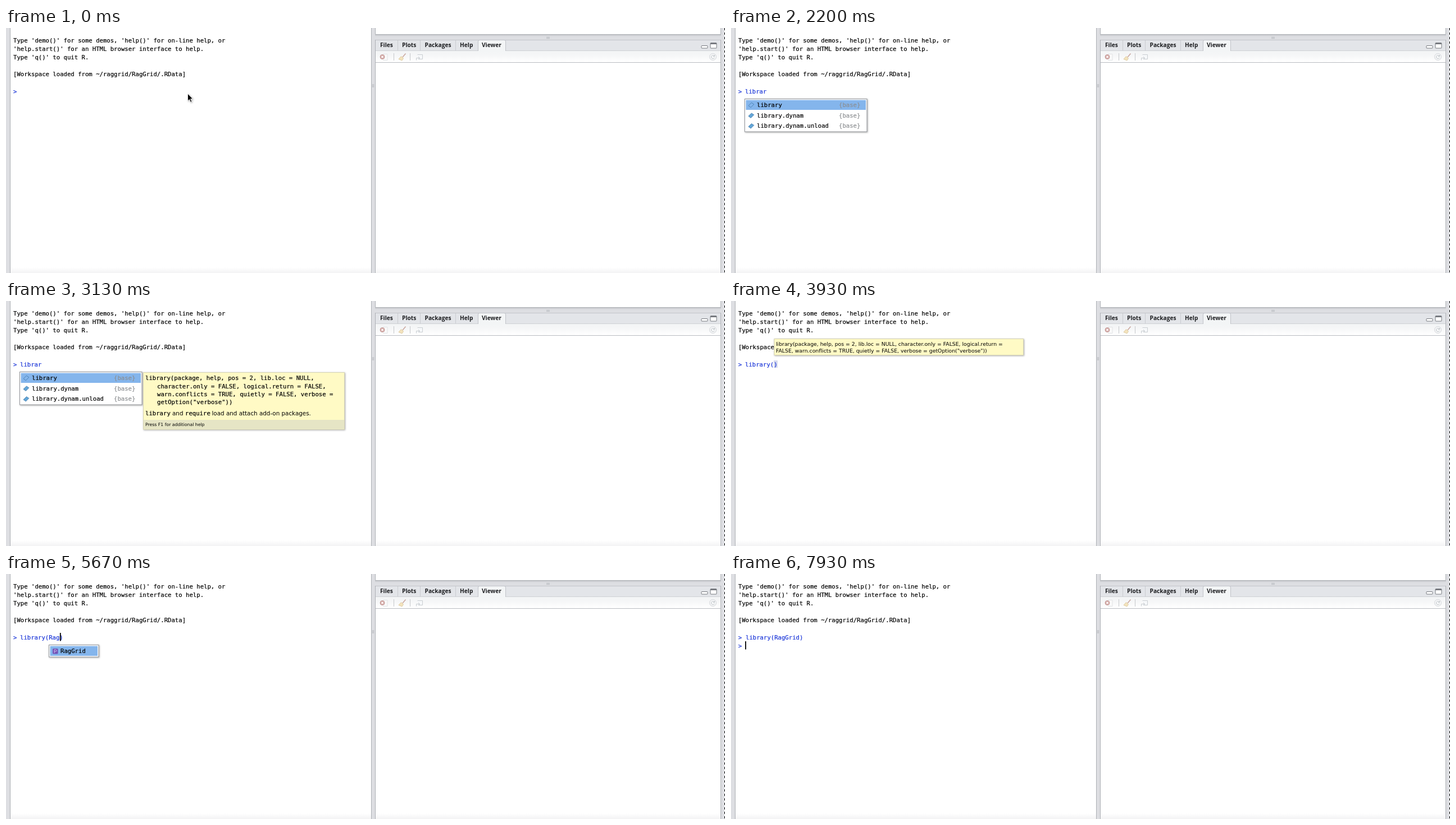
These frames come from a looping animation (1280 px wide and 437 px high, 8 s). An HTML page:

```html
<!DOCTYPE html>
<html lang="en">
<head>
<meta charset="utf-8">
<title>R console</title>
<style>
html, body { margin: 0; width: 100%; height: 100%; overflow: hidden; background: #fff; }
svg { display: block; width: 1280px; height: 437px; }
text {
  font: 10.64px "DejaVu Sans Mono", monospace; white-space: pre;
  color: #000; fill: currentColor; stroke: currentColor; stroke-width: .2px;
}
.blue { color: #1a35d8; }
.base { color: #8c8f92; }
.tab { font: bold 10.2px "Open Sans", sans-serif; color: #1c1d20; stroke: none; }
.desc { font: 10.35px "DejaVu Sans", sans-serif; stroke: none; }
.foot { font: 7.76px "DejaVu Sans", sans-serif; stroke: none; }
.tip { font: 9.3px "DejaVu Sans", sans-serif; stroke: none; }
.shadow { filter: drop-shadow(1px 1px 1.5px #0005); }
.box { fill: #fff; stroke: #92959a; }
.note { fill: #fffac5; stroke: #d6d3b4; }
.pick { fill: #84b5ec; }
</style>
</head>
<body>
<svg viewBox="0 0 1280 437">
  <defs>
    <linearGradient id="bar" x2="0" y2="1">
      <stop stop-color="#f3f5f6"/><stop offset=".35" stop-color="#f5f6f7"/><stop offset="1" stop-color="#fff"/>
    </linearGradient>
    <linearGradient id="fade" x2="0" y2="1">
      <stop stop-color="#fff"/><stop offset="1" stop-color="#f3f3f4"/>
    </linearGradient>
    <linearGradient id="edge" x2="0" y2="1">
      <stop stop-color="#c3c5c9"/><stop offset="1" stop-color="#dddee2"/>
    </linearGradient>
    <path id="fn" d="M.5 6 6 .7 10.3 3.6 4.8 9.2Z" stroke="#3f78a8" stroke-width=".8"/>
  </defs>

  <!-- panes -->
  <rect width="1280" height="437" fill="#dddee2"/>
  <rect x="8" width="642" height="437" fill="#fff"/>
  <rect x="658" width="614" height="11" fill="#fff"/>
  <rect x="657" y="12" width="616" height="3" fill="url(#edge)"/>
  <path d="M7.5 0V437M650.5 0V437M657.5 21V437M1272.5 21V437M657.5 0V11.5H1272.5V0" fill="none" stroke="#adb0b5"/>
  <path d="M962 16.5h6M962 18.5h6M652.5 100v6M654.5 100v6" stroke="#b3b5ba" stroke-width=".9"/>
  <rect x="658" y="21" width="614" height="20" fill="#e3e5e9"/>
  <path d="M658 21.5H1272" stroke="#c3c5ca"/>
  <path d="M697.5 22V40M737.5 22V40M800.5 22V40" stroke="#c9cbd0"/>
  <path d="M840.5 41V24q0-2.5 2.5-2.5H887q2.5 0 2.5 2.5V41" fill="#f3f5f6" stroke="#c0c2c8"/>
  <path d="M658 40.5H840M890 40.5H1272" stroke="#cfd1d5"/>
  <rect x="658" y="41" width="614" height="20" fill="url(#bar)"/>
  <rect x="658" y="61" width="614" height="376" fill="#fff"/>
  <path d="M658 61.5H1272" stroke="#b9bcc1"/>
  <path d="M8 427H650V437H8ZM658 427H1272V437H658Z" fill="url(#fade)"/>
  <path d="M1279.5 0V437" stroke="#fff"/>
  <path d="M1279.5 0V437" stroke="#000" stroke-dasharray="4 4"/>
  <text class="tab" x="666" y="34">Files</text>
  <text class="tab" x="705" y="34">Plots</text>
  <text class="tab" x="745.5" y="34">Packages</text>
  <text class="tab" x="808" y="34">Help</text>
  <text class="tab" x="847" y="34">Viewer</text>

  <!-- window and toolbar icons -->
  <rect x="1238" y="31.5" width="11" height="4.5" rx="1" fill="#fff" stroke="#777a80"/>
  <rect x="1254" y="26.5" width="11" height="9.5" rx="1" fill="#fff" stroke="#777a80"/>
  <path d="M1254 28H1265" stroke="#777a80" stroke-width="2"/>
  <path d="M690.5 45V58M719.5 45V58" stroke="#c6c8cb"/>
  <g fill="none" stroke="#c9cdd1">
    <path d="M671 46.5h8v11h-8" fill="#fafafa" stroke="#e1e3e5"/>
    <circle cx="670" cy="51.5" r="4" fill="#d3a3a0" stroke="#c3a19f"/>
    <path d="M668.3 49.8l3.4 3.4m0-3.4l-3.4 3.4" stroke="#fff" stroke-width="1.3"/>
    <path d="M711.5 45.5L706 52" stroke="#cba9a0" stroke-width="1.6"/>
    <path d="M703.5 50.5l4 3.5-2.5 4-6-2.5Z" fill="#f3e3bd" stroke="#dfcda5"/>
    <path d="M732.5 47.5h9v8h-7M730.5 57.5v-4h6m-2.5-2.5l2.5 2.5-2.5 2.5" fill="#f6f8fa"/>
    <circle cx="1258.5" cy="51.5" r="6" fill="#f6f7f8" stroke="#d2d5d9"/>
    <path d="M1261 50a3 3 0 1 0 .3 2.8M1261.5 48v2.5h-2.5" stroke="#bfc4c9"/>
  </g>

  <!-- console -->
  <text x="13" y="26">Type 'demo()' for some demos, 'help()' for on-line help, or</text>
  <text x="13" y="41">'help.start()' for an HTML browser interface to help.</text>
  <text x="13" y="56">Type 'q()' to quit R.</text>
  <text x="13" y="86">[Workspace loaded from ~/raggrid/RagGrid/.RData]</text>
  <text class="blue" x="13" y="117">&gt;</text>
  <rect id="bracket" x="76" y="106" width="7" height="13" fill="#d5daee"/>
  <text class="blue" id="input" y="116.5"></text>
  <text class="blue" id="prompt" x="13" y="132">&gt;</text>
  <rect id="caret" width="1.8" height="14.5"/>

  <!-- function completions -->
  <g id="functions">
    <rect class="box shadow" id="list" x="24.5" y="126.5" width="217.5"/>
    <rect class="pick" x="26.5" y="128.5" width="213.5" height="17.5"/>
    <use href="#fn" x="30.5" y="132.5" fill="#84b5ec"/>
    <text x="46" y="141">library</text><text class="base" x="192" y="141">{base}</text>
    <use href="#fn" x="30.5" y="151.2" fill="#63a6d8"/>
    <text x="46" y="159.7">library.dynam</text><text class="base" x="192" y="159.7">{base}</text>
    <use href="#fn" x="30.5" y="169.9" fill="#63a6d8"/>
    <text x="46" y="178.4">library.dynam.unload</text><text class="base" x="192" y="178.4">{base}</text>
    <g id="curl">
      <use href="#fn" x="30.5" y="188.6" fill="#63a6d8"/>
      <text x="46" y="197.1">libcurlVersion</text><text class="base" x="192" y="197.1">{base}</text>
    </g>
  </g>

  <g id="help">
    <rect class="note shadow" x="244.5" y="127.5" width="358" height="101.5"/>
    <rect x="245" y="212" width="357" height="16.5" fill="#e6e5c5"/>
    <text x="248" y="141">library(package, help, pos = 2, lib.loc = NULL,</text>
    <text x="269" y="155.5">character.only = FALSE, logical.return = FALSE,</text>
    <text x="269" y="169.5">warn.conflicts = TRUE, quietly = FALSE, verbose =</text>
    <text x="269" y="184">getOption("verbose"))</text>
    <text x="248" y="204">library</text>
    <text class="desc" x="296" y="204">and</text>
    <text x="319" y="204">require</text>
    <text class="desc" x="366.5" y="204">load and attach add-on packages.</text>
    <text class="foot" x="248" y="223">Press F1 for additional help</text>
  </g>

  <g id="signature">
    <rect class="note shadow" x="77" y="67.5" width="443.5" height="29"/>
    <text class="tip" x="80" y="80">library(package, help, pos = 2, lib.loc = NULL, character.only = FALSE, logical.return =</text>
    <text class="tip" x="80" y="92">FALSE, warn.conflicts = TRUE, quietly = FALSE, verbose = getOption("verbose"))</text>
  </g>

  <g id="packages">
    <rect class="box shadow" x="76.5" y="126.5" width="88.5" height="21.5"/>
    <rect class="pick" x="78.5" y="128.5" width="84.5" height="17.5"/>
    <rect x="83" y="133" width="9.5" height="9.5" rx="1.5" fill="#7352b5"/>
    <path d="M86 141v-6h2.2q1.8 0 1.8 1.7t-1.8 1.7H86" fill="none" stroke="#d8c8f2" stroke-width=".9"/>
    <text x="97" y="141">RagGrid</text>
  </g>

  <!-- mouse pointer -->
  <path id="mouse" class="shadow" d="M323.5 117v13.2l3-2.8 2.2 5 2.2-1-2.2-4.8h4Z" stroke="#fff" stroke-width=".9"/>
</svg>
<script>
const LOOP = 8000, CHAR = 6.4, ENTER = 7450;
const COMMAND = 'library(RagGrid';
// Time of each key; the last one accepts the completion.
const KEYS = [400, 520, 640, 1050, 1350, 1600, 3200, 3400, 4300, 4450, 4620, 6250];
const el = id => document.getElementById(id);
const show = (id, on) => el(id).setAttribute('visibility', on ? 'inherit' : 'hidden');
const set = (id, name, value) => el(id).setAttribute(name, value);

function draw(t) {
  const within = (from, to) => t >= from && t < to;
  const count = KEYS.filter(k => k <= t).length;
  const typed = count === KEYS.length ? COMMAND : COMMAND.slice(0, count);
  const entered = t >= ENTER;
  const lastKey = entered ? ENTER : count ? KEYS[count - 1] : -500;

  el('input').textContent = typed + (count >= 8 ? ')' : '');
  set('input', 'x', entered ? 26 : 25);
  set('caret', 'x', entered ? 25.2 : 25.5 + typed.length * CHAR);
  set('caret', 'y', entered ? 120 : 105);
  show('caret', (t - lastKey) % 1000 < 500);
  show('prompt', entered);
  show('bracket', count === 8);
  show('mouse', t < KEYS[0]);

  const allMatches = t < 1300;
  show('functions', within(800, KEYS[7]));
  show('curl', within(800, 1300));
  set('list', 'height', allMatches ? 77.5 : 58.5);
  show('help', within(2750, KEYS[7]));
  show('signature', within(3550, KEYS[8]));
  show('packages', within(4870, KEYS[11]));
}

function tick() {
  draw(performance.now() % LOOP);
  requestAnimationFrame(tick);
}
tick();
</script>
</body>
</html>
```
